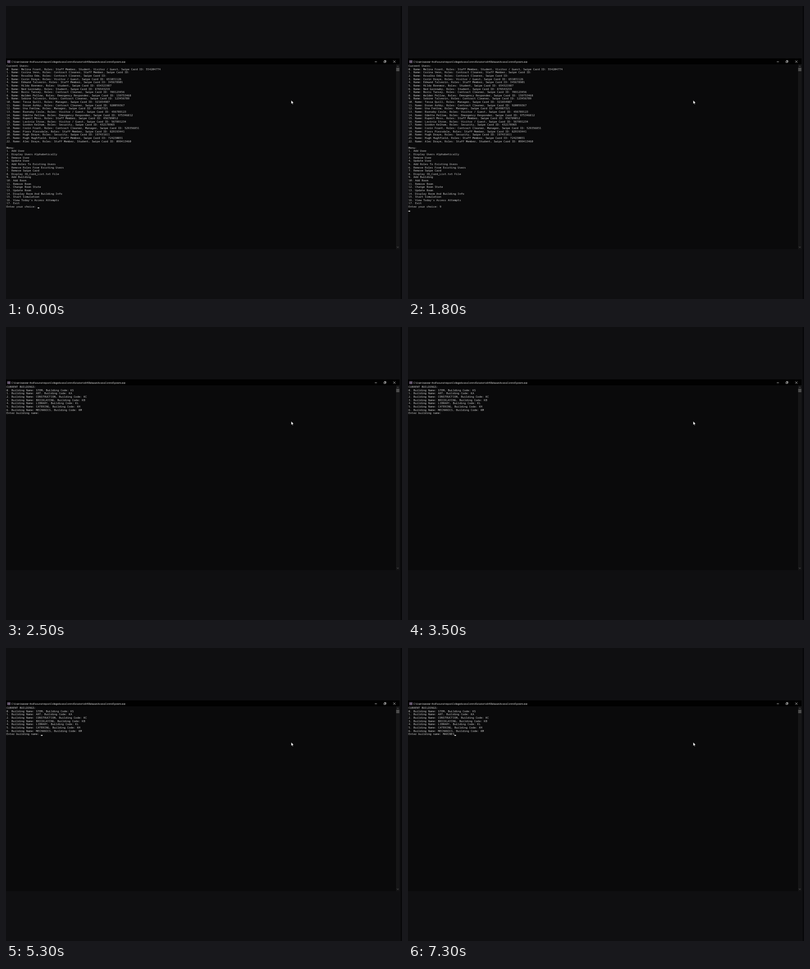
Recreate the animation shown at these times as an HTML page. Size 800 by 593 pixels, loop 8000 ms.

```html
<!DOCTYPE html>
<html lang="en">
<head>
<meta charset="utf-8">
<title>Access control console</title>
<style>
  html, body { margin: 0; width: 100%; height: 100%; overflow: hidden; background: #0f0f11; }
  #stage { position: relative; width: 800px; height: 593px; overflow: hidden; background: #0f0f11; }
  #stage > * { position: absolute; }
  #edge { left: 797px; top: 0; width: 3px; height: 593px; background: #08080a; }
  #window { left: 0; top: 106px; width: 795px; height: 386px; background: #0a0a0b; }
  #bar { left: 0; top: 106px; width: 795px; height: 12px; background: #010101; }
  #title, #screen { margin: 0; white-space: pre; transform-origin: 0 0; }
  #title {
    left: 11.2px; top: 109.6px; color: #f2f2f2;
    font: 20px/28px "Open Sans", sans-serif; transform: scale(.237);
  }
  /* 12 x 24 character cells, shrunk evenly */
  #screen {
    left: 1.2px; top: 118.1px; color: #ccc;
    font: 20px/24px "Noto Sans Mono", monospace; transform: scale(.276);
  }
  #caret { display: inline-block; width: 12px; height: 6px; vertical-align: bottom; background: #f2f2f2; }
  svg { left: 0; top: 0; }
</style>
</head>
<body>
<div id="stage">
  <div id="edge"></div>
  <div id="window"></div>
  <div id="bar"></div>
  <div id="title">C:\Users\wester tholl\source\repos\CollegeAccessControlSolution\x64\Release\AccessControlSystem.exe</div>
  <pre id="screen"><span id="text"></span><i id="caret"></i></pre>
  <svg width="800" height="593" fill="none">
    <rect x="2.5" y="110" width="6.5" height="5.5" fill="#66586f"/>
    <g stroke="#d8d8d8" stroke-width=".8">
      <path d="M745 112.9h4.4M782.4 110.4l4.4 4.4m0-4.4l-4.4 4.4"/>
      <path d="M763.6 111.5h3v3h-3zM764.7 111.4v-1h3v3h-1"/>
    </g>
    <rect x="788" y="118" width="7" height="374" fill="#161617"/>
    <rect x="788.3" y="125" width="6.4" height="7" fill="#4d4d4d"/>
    <path d="M789.8 123l1.7-1.7 1.7 1.7M789.8 487.2l1.7 1.7 1.7-1.7" stroke="#777" stroke-width=".8"/>
    <path d="M576.2 191v7l1.6-1.5 1.1 2.5 1.1-.5-1.1-2.4h2.2z" fill="#fff" stroke="#000" stroke-width=".3"/>
  </svg>
</div>
<script>
const LOOP = 8000;

const roleNames = {
  S: "Staff Member", T: "Student", V: "Visitor / Guest", C: "Contract Cleaner",
  E: "Emergency Responder", M: "Manager", G: "Security"
};

// name | role letters | card
const users = `Melina Frant|STV|554204774
Corina Venn|CS|
Rosalba Ode|C|
Corin Draye|V|651031126
Edmund Talverin|S|345678901
Hilda Brenmor|T|654321987
Ned Garrowby|T|876543219
Boris Tansey|C|789123456
Walden Pellow|E|159753468
Sabine Talverin|C|123456789
Tessa Quill|M|321654987
Doran Ashby|C|920059367
Una Fenlow|M|654987321
Barnaby Crole|V|456789123
Odette Pellow|E|975346812
Rupert Moss|S|456789012
Lavinia Stroe|V|567891234
Gordon Kelham|G|432178965
Corin Frant|CM|529356851
Piers Piersdale|S|829193441
Hugh Draye|G|197431611
Hugh Hughfield|S|724230031
Alec Draye|ST|099413460`.split("\n").map((line, i) => {
  const [name, roles, card] = line.split("|");
  const list = [...roles].map(r => roleNames[r]).join(", ");
  return `${i}. Name: ${name}, Roles: ${list}, Swipe Card ID: ${card}`;
});

const menu = [
  "Add User", "Display Users Alphabetically", "Remove User", "Update User",
  "Add Roles To Existing Users", "Remove Roles From Existing Users", "Remove Swipe Card",
  "Display ID_Card_List.txt File", "Add Building", "Add Room", "Remove Room",
  "Change Room State", "Update Room", "Display Room And Building Info",
  "Start Simulation", "View Today's Access Attempts", "Exit"
].map((item, i) => `${i + 1}${i === 9 ? ":" : "."} ${item}`);

const buildings = "STEM KS,ART KA,CONSTRUCTION KC,BRICKLAYING KB,LIBRARY KL,CATERING KH,MECHANICS KM"
  .split(",").map((entry, i) => {
    const [name, code] = entry.split(" ");
    return `${i}. Building Name: ${name}, Building Code: ${code}`;
  });

const home = ["Current Users:", ...users, "", "Menu:", ...menu, "Enter your choice: "].join("\n");
const form = ["CURRENT BUILDINGS:", ...buildings, "Enter building name: "].join("\n");

// start time, page, typed text, caret shown
const steps = [
  [0, home, "", 1], [400, home, "", 0], [1000, home, "", 1],
  [1100, home, "9", 1], [1500, home, "9", 0], [1800, home, "9\n", 1],
  [2000, form, "", 1], [2400, form, "", 0], [3100, form, "", 1], [3500, form, "", 0],
  [4100, form, "", 1], [4800, form, "", 0], [5200, form, "", 1],
  [5800, form, "MA", 1], [6000, form, "MARI", 1], [6100, form, "MARIN", 1],
  [6300, form, "MARINE", 1], [6400, form, "MARINES", 1],
  [6800, form, "MARINES", 0], [7300, form, "MARINES", 1]
];

const text = document.getElementById("text");
const caret = document.getElementById("caret");
let shown;

function draw() {
  const time = performance.now() % LOOP;
  const step = steps.filter(s => s[0] <= time).pop();
  if (step !== shown) {
    shown = step;
    text.textContent = step[1] + step[2];
    caret.style.visibility = step[3] ? "visible" : "hidden";
  }
  requestAnimationFrame(draw);
}
draw();
</script>
</body>
</html>
```
